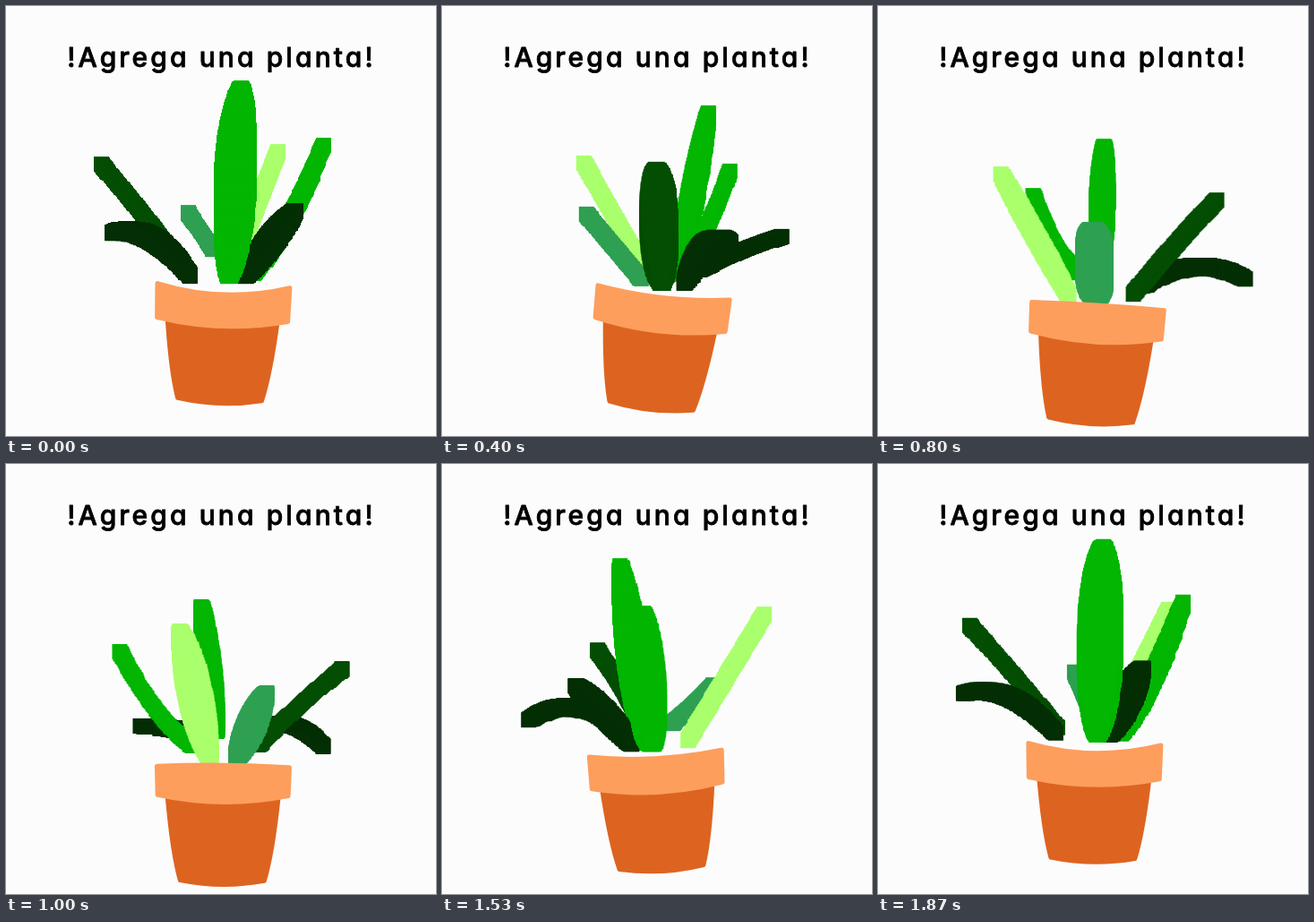
An HTML page with a canvas that plays this animation: 480 by 480 pixels, repeating every 1930 ms.

```html
<!DOCTYPE html>
<html lang="es">
<head>
<meta charset="utf-8">
<style>
html, body { margin: 0; width: 100%; height: 100%; overflow: hidden; background: #fcfcfd; }
canvas, svg { position: absolute; left: 0; top: 0; }
text {
  font: 500 30px Inter, "Open Sans", sans-serif;
  font-feature-settings: "cv11";
  letter-spacing: 3.1px;
  text-anchor: middle;
  stroke: #000; stroke-width: .8; stroke-linejoin: round;
}
</style>
</head>
<body>
<canvas width="480" height="480"></canvas>
<svg width="480" height="480"><text x="240.5" y="68">!Agrega una planta!</text></svg>
<script>
const ctx = document.querySelector('canvas').getContext('2d');
const { sin, cos, PI, abs, max, round } = Math;
const LOOP = 1930;
const STEPS = 29;
const TIP = 17;

// front: turn in degrees at which the leaf faces the viewer; reach and height place the tip
const leaves = [
  { color: '#044e04', front: 78, reach: 140, height: 121, bend: 5, width: 21 },
  { color: '#02b602', front: 292, reach: 120, height: 140, bend: -25, width: 21 },
  { color: '#02b602', front: 337, reach: 50, height: 197, bend: 0, width: 30 },
  { color: '#aaff6c', front: 209, reach: 125, height: 148, bend: 0, width: 22 },
  { color: '#042e04', front: 48, reach: 168, height: 39, bend: 36, width: 21 },
  { color: '#042e04', front: 325, reach: 140, height: 62, bend: 5, width: 21 },
  { color: '#2fa052', front: 153, reach: 88, height: 80, bend: 0, width: 21 }
];

const bezier = (a, b, c, u) => a * (1 - u) ** 2 + 2 * b * u * (1 - u) + c * u * u;

// A square brush runs from tip to base, swelling in the middle
function drawLeaf({ color, reach, height, bend, width, angle }, turn) {
  const near = cos(angle);
  const tipX = reach * sin(angle);
  const tipY = -height - 12 * near - 10 * cos(turn);
  const baseX = tipX * .3;
  const baseY = -8 - 34 * ((1 - near) / 2) ** 2;
  const midX = (tipX + baseX) / 2;
  const midY = (tipY + baseY) / 2 - bend;
  const dx = abs(tipX - baseX), dy = abs(tipY - baseY);
  // A slanted square sweeps a wider band, so shrink it to keep the thickness
  const full = (width + 23 * max(0, near) ** 2) * Math.hypot(dx, dy) / (dx + dy);
  ctx.fillStyle = color;
  for (let u = 0; u <= 1; u += 1 / 90) {
    const size = TIP + (full - TIP) * max(0, sin(PI * u)) ** .7;
    const x = bezier(tipX, midX, baseX, u), y = bezier(tipY, midY, baseY, u);
    ctx.fillRect(round(x - size / 2), round(y - size / 2), round(size), round(size));
  }
}

function fillRound(color) {
  ctx.closePath();
  ctx.fillStyle = ctx.strokeStyle = color;
  ctx.fill();
  ctx.stroke();
}

function drawPot(turn) {
  const rim = 37 + 3 * cos(turn);
  ctx.rotate((4 + 13 * sin(turn + .1)) / 153);

  ctx.beginPath();
  ctx.moveTo(-62, 35);
  ctx.quadraticCurveTo(-56, 98, -47, 129);
  ctx.quadraticCurveTo(0, 138, 47, 129);
  ctx.quadraticCurveTo(56, 98, 62, 35);
  fillRound('#dd6420');

  ctx.beginPath();
  ctx.moveTo(-74, 2);
  ctx.quadraticCurveTo(0, 10 + 12 * cos(turn), 74, 2);
  ctx.lineTo(73, rim);
  ctx.quadraticCurveTo(0, rim + 15, -73, rim);
  fillRound('#fd9e5d');
}

ctx.lineWidth = 5;
ctx.lineJoin = 'round';

function draw(now) {
  // About 15 drawings a second
  const step = Math.floor((now % LOOP + 4) * 3 / 200) % STEPS;
  const turn = 2 * PI * step / STEPS;
  ctx.fillStyle = '#fcfcfd';
  ctx.fillRect(0, 0, 480, 480);
  ctx.save();
  ctx.translate(243 + 5 * sin(turn), 323 - 13 * cos(turn - .13));
  leaves
    .map(l => ({ ...l, angle: turn - l.front * PI / 180 }))
    .sort((a, b) => cos(a.angle) - cos(b.angle))
    .forEach(l => drawLeaf(l, turn));
  drawPot(turn);
  ctx.restore();
  requestAnimationFrame(draw);
}
draw(0);
</script>
</body>
</html>
```
